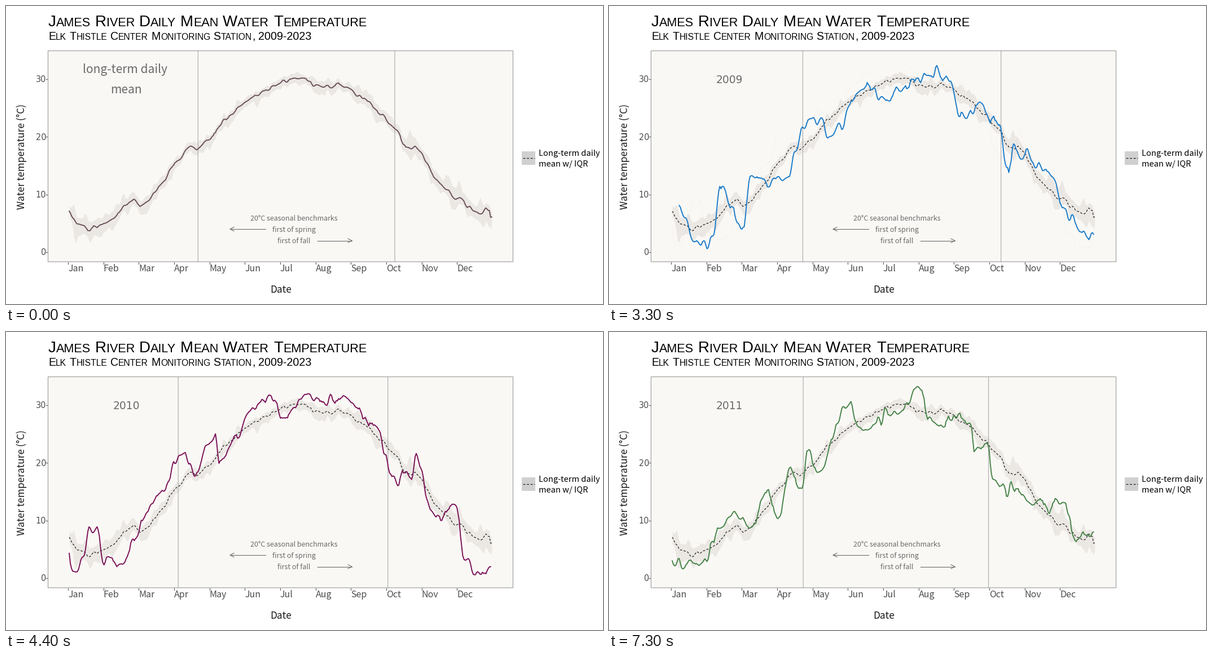
Animation of 1058 by 529 pixels, one loop 8000 ms. Source, as a matplotlib script:

```python
from itertools import groupby

import matplotlib.pyplot as plt
import numpy as np
from matplotlib.animation import FuncAnimation

W, H, DPI = 1058, 529, 64
PT = 72 / DPI                      # points per pixel
FRAMES, INTERVAL = 80, 100
PERIOD, FIRST, STEPS = 29, 3, 12   # timing of the year changes, in frames

SANS, CAPS, DIGITS = "Noto Sans CJK JP", "Liberation Sans", "DejaVu Sans"
PANEL, RIBBON, INK, GREY = "#faf8f5", "#ebe8e4", "#1a1a1a", "#6b6b6b"

# Main swings of each curve: day of year, temperature in °C.
MEAN = [(1, 7.1), (8, 4.9), (31, 5), (55, 8.9), (65, 8.3), (104, 18.2),
        (112, 17.9), (152, 25.9), (204, 30.1), (214, 29), (243, 28.3),
        (282, 21.3), (291, 18.2), (302, 17.7), (320, 12), (354, 6.7),
        (363, 7.2), (365, 6.1)]
Y2009 = [(7, 8.1), (20, 1.8), (36, 2.8), (43, 11), (62, 4.3), (68, 13.1),
         (98, 12.7), (118, 22.9), (139, 20.2), (163, 28), (185, 26.3),
         (223, 30.5), (241, 29.6), (253, 23.3), (266, 26), (282, 22),
         (291, 13.8), (297, 17.9), (324, 14), (354, 3.4), (364, 3.1)]
Y2010 = [(1, 4.3), (4, 1.2), (25, 8.9), (31, 2.3), (42, 2), (81, 15.2),
         (98, 21.4), (111, 18.3), (127, 25), (131, 20.3), (157, 29),
         (174, 31.7), (183, 27.7), (205, 31.8), (244, 30.4), (266, 26.2),
         (279, 17.6), (296, 17.1), (300, 21.6), (312, 11.9), (334, 12.6),
         (341, 3.3), (349, 0.7), (364, 2)]
Y2011 = [(1, 3), (10, 1.6), (24, 2.2), (50, 10.6), (73, 9.5), (82, 14.8),
         (92, 10.3), (102, 19.1), (113, 15.6), (117, 22), (126, 18.3),
         (153, 30), (167, 25.7), (200, 29.1), (210, 32.8), (226, 27.1),
         (258, 26.7), (261, 21.9), (273, 23.1), (277, 17.2), (308, 13.2),
         (340, 13), (346, 7.5), (364, 8)]

YEARS = [(Y2009, "#1478c8"), (Y2010, "#780f55"), (Y2011, "#438245")]
SPRING = [340.3, 344, 305.2, 344.2]
FALL = [689, 695, 676.8, 672.6]

rng = np.random.default_rng(7)
fig = plt.figure(figsize=(W / DPI, H / DPI), dpi=DPI, facecolor="white")
ax = fig.add_axes([0, 0, 1, 1])
ax.set(xlim=(0, W), ylim=(H, 0))
ax.axis("off")


def to_x(day):
    return 110 + 2.057 * day


def to_y(temp):
    return 437 - 10.25 * temp


def season(day):
    """Yearly course of the water temperature, two harmonics."""
    t = 2 * np.pi * day / 365
    return (17.98 - 11.31 * np.cos(t) - 4.51 * np.sin(t)
            - 0.48 * np.cos(2 * t) - 0.09 * np.sin(2 * t))


def weather(n):
    """Random day-to-day variation, smoothed over five days."""
    kernel = np.array([1, 2, 3, 2, 1])
    return np.convolve(rng.normal(size=n + 4), kernel / np.linalg.norm(kernel),
                       "valid")


def daily(swings, roughness):
    """Season plus eased swings, with weather that dies out at each swing."""
    day, temp = np.array(swings, float).T
    offset = temp - season(day)
    days = np.arange(day[0], day[-1] + 1)
    i = np.clip(np.searchsorted(day, days, side="right") - 1, 0, day.size - 2)
    part = (days - day[i]) / (day[i + 1] - day[i])
    drift = offset[i] + (offset[i + 1] - offset[i]) * (1 - np.cos(np.pi * part)) / 2
    wiggle = roughness * np.sin(np.pi * part) * weather(days.size)
    return days, season(days) + drift + wiggle


def line(xs, ys, color, width, **kw):
    return ax.plot(xs, ys, color=color, lw=width * PT, **kw)[0]


def curve(days, temps, color):
    return line(to_x(days), to_y(temps), color, 1.9)


def text(x, y, string, size, color=INK, ha="left", font=SANS, **kw):
    kw.setdefault("va", "baseline")
    return ax.text(x, y, string, fontsize=size * PT, color=color, ha=ha,
                   family=font, **kw)


def advance(string, size, font):
    """Pen advance of a run, spaces and side bearings included."""
    widths = []
    for sample in ("I" + string + "I", "II"):
        probe = text(0, 0, sample, size, font=font)
        widths.append(probe.get_window_extent().width)
        probe.remove()
    return widths[0] - widths[1]


def small_caps(x, y, string, size, ratio):
    for (space, lower), run in groupby(
            string, key=lambda c: (c.isspace(), c.islower())):
        run = "".join(run).upper()
        run_size = size * ratio if lower else size
        if not space:
            text(x, y, run, run_size, "black", font=CAPS)
        x += advance(run, run_size, CAPS)


def arrow(tail, tip, y):
    back = tip - 7 * np.sign(tip - tail)
    line([tail, tip], [y, y], GREY, 1.1)
    line([back, tip, back], [y - 3.5, y, y + 3.5], GREY, 1.1)


def ease(t):
    return 2 * t * t if t < 0.5 else 1 - 2 * (1 - t) ** 2


# Titles and axes
small_caps(75, 36, "James River Daily Mean Water Temperature", 27.75, 0.78)
small_caps(75, 60, "Elk Thistle Center Monitoring Station, 2009-2023", 19.6, 0.8)
text(28, 267, "Water temperature (°C)", 17.3, ha="center", va="center",
     rotation=90)
text(487, 509, "Date", 17.4, ha="center")
ax.add_patch(plt.Rectangle((74.5, 79.5), 824, 374.5, fc=PANEL, ec="none"))
for value in range(0, 40, 10):
    y = to_y(value)
    line([71, 74], [y, y], "#555555", 1.1)
    text(71, y + 5.5, str(value), 14.5, "#4d4d4d", "right", DIGITS)
for i, month in enumerate("Jan Feb Mar Apr May Jun Jul Aug Sep Oct Nov Dec".split()):
    x = 110 + 62.65 * i
    line([x, x], [454.5, 457.5], "#555555", 1.1)
    text(x, 471, month, 16, "#4d4d4d")

# Interquartile band and dashed mean
days, mean = daily(MEAN, 0.35)
spread = 1.2 + 0.35 * np.cos(2 * np.pi * days / 365)
upper, lower = (spread * np.exp(0.3 * weather(days.size)) for _ in range(2))
ax.fill_between(to_x(days), to_y(mean + upper), to_y(mean - lower),
                color=RIBBON, lw=0)
DASH = dict(ls=(0, (3.2, 2.3)), dash_capstyle="butt")
line(to_x(days), to_y(mean), INK, 1.2, **DASH)

# Benchmarks note
text(510.5, 381, "20°C seasonal benchmarks", 12.4, GREY, "center")
text(510.5, 401, "first of spring", 12.5, GREY, "center")
text(510.5, 421, "first of fall", 12.5, GREY, "center")
arrow(460, 397, 396)
arrow(552, 613, 416.5)

# Legend
ax.add_patch(plt.Rectangle((914, 258), 24, 24, fc="#d0d0d0", ec="none"))
line([916, 937], [270, 270], INK, 1.2, **DASH)
text(944, 266, "Long-term daily", 14.6, "black")
text(944, 285, "mean w/ IQR", 14.6, "black")

# Moving parts
vlines = [line([0, 0], [79.5, 454], "#a8a8a8", 1.1, snap=False)
          for _ in range(2)]
curves = [curve(days, mean, "#6e535d")]
curves += [curve(*daily(swings, 0.9), color) for swings, color in YEARS]
intro = [text(211, 119, "long-term daily", 21, GREY, "center"),
         text(212.5, 155, "mean", 21, GREY, "center")]
year = text(213, 137, "", 18.8, GREY, "center", DIGITS)
ax.add_patch(plt.Rectangle((74.5, 79.5), 824, 374.5, fill=False, ec="#a0a0a0",
                           lw=1.2 * PT, zorder=5, snap=False))


def update(frame):
    stage = sum(ease(np.clip((frame - FIRST - PERIOD * n) / STEPS, 0, 1))
                for n in range(3))
    for i, artist in enumerate(curves):
        artist.set_alpha(max(0, 1 - abs(stage - i)))
    for vline, stops in zip(vlines, (SPRING, FALL)):
        x = np.interp(stage, range(4), stops)
        vline.set_xdata([x, x])
    for label in intro:
        label.set_alpha(max(0, 1 - stage))
    year.set_text(str(2008 + max(1, int(stage + 0.5))))
    year.set_alpha(min(1, stage))
    return [*curves, *vlines, *intro, year]


anim = FuncAnimation(fig, update, frames=FRAMES, interval=INTERVAL,
                     repeat=True, repeat_delay=0)
plt.show()
```
